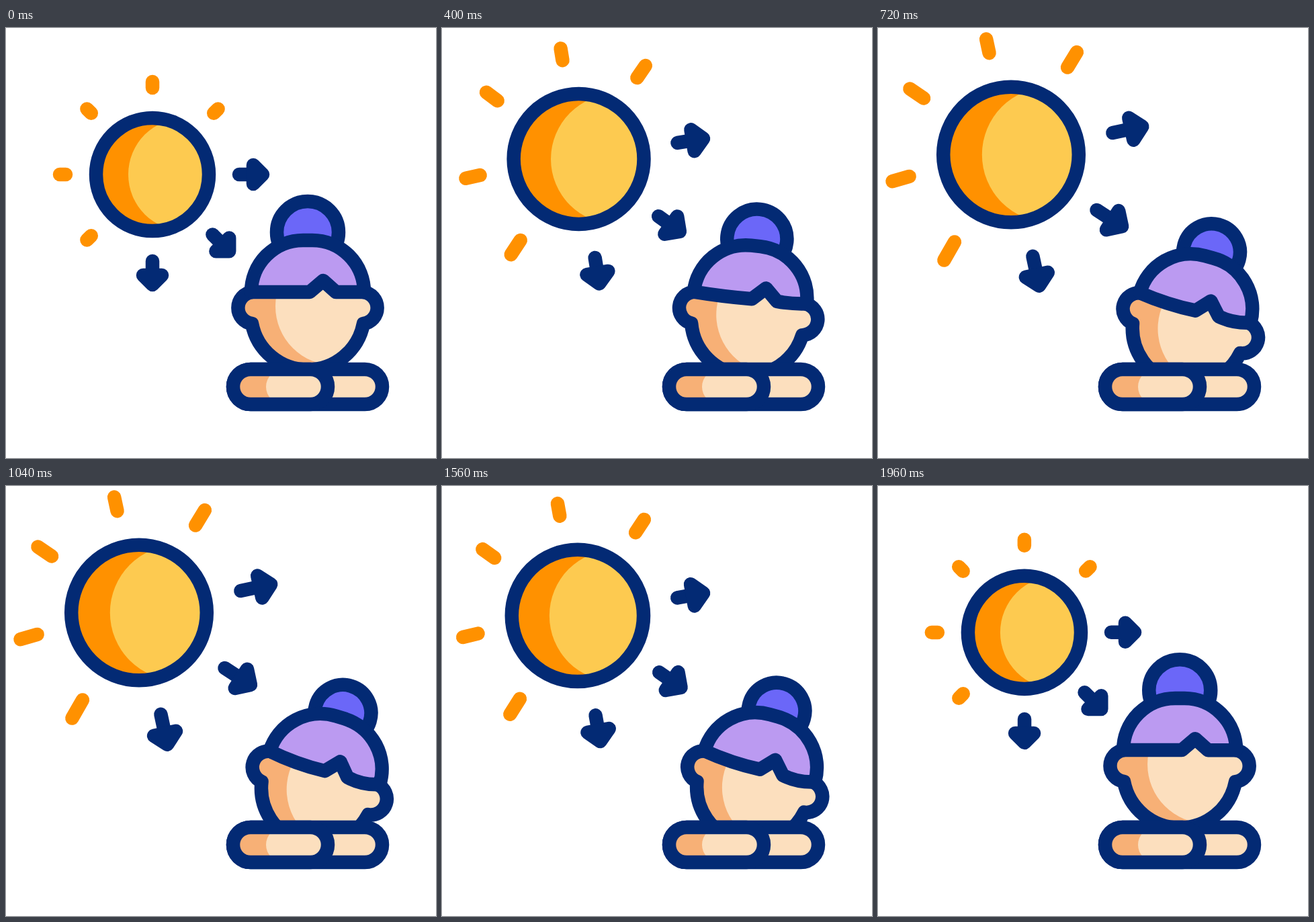
Animation of 640 by 640 pixels, one loop 2000 ms. Source, as an HTML page without scripts:

```html
<!DOCTYPE html>
<html lang="en">
<head>
<meta charset="utf-8">
<title>Sun and resting head</title>
<style>
  /* --sun: sun growth, --nod: head tilt, --push: arrow pulse */
  @property --sun { syntax: "<number>"; inherits: true; initial-value: 0; }
  @property --nod { syntax: "<number>"; inherits: true; initial-value: 0; }
  @property --push { syntax: "<number>"; inherits: true; initial-value: 0; }

  html, body { margin: 0; width: 100%; height: 100%; overflow: hidden; background: #fff; }
  svg {
    display: block; width: 100%; height: 100%;
    --line: 20.5px;
    animation: grow 2s infinite, nod 2s infinite, push 2s infinite;
  }

  @keyframes grow {
    0%, 4% { --sun: 0; animation-timing-function: cubic-bezier(.4, 0, .25, 1); }
    35% { --sun: 1; }
    71% { --sun: 1; animation-timing-function: cubic-bezier(.33, 0, .67, 1); }
    99%, 100% { --sun: 0; }
  }
  @keyframes nod {
    0%, 4% { --nod: 0; animation-timing-function: cubic-bezier(.33, 0, .67, 1); }
    44% { --nod: 1; }
    74% { --nod: 1; animation-timing-function: cubic-bezier(.33, 0, .67, 1); }
    99%, 100% { --nod: 0; }
  }
  @keyframes push {
    0%, 20% { --push: 0; animation-timing-function: cubic-bezier(.33, 0, .67, 1); }
    46% { --push: 1; animation-timing-function: cubic-bezier(.33, 0, .67, 1); }
    68%, 100% { --push: 0; }
  }
  @keyframes fringe {
    0%, 4%, 99%, 100% {
      d: path("M365 393Q408 393 452 393L472 376L491 393Q512 393 533 393A77 77 0 0 0 456 316H442A77 77 0 0 0 365 393Z");
      animation-timing-function: cubic-bezier(.33, 0, .67, 1);
    }
    44%, 74% {
      d: path("M364 393Q408 400 451 397L469 377L486 396Q510 401 535 392A79 78 0 0 0 456 314H443A79 79 0 0 0 364 393Z");
      animation-timing-function: cubic-bezier(.33, 0, .67, 1);
    }
  }

  .ink { stroke: #032a74; stroke-width: var(--line); stroke-linecap: round; stroke-linejoin: round; fill: none; }

  .flare {
    --size: calc(1 + .2 * var(--sun));
    --line: calc(20.5px / var(--size));
    transform-origin: 175.7px 326.7px;
    transform: rotate(calc(-12.1deg * var(--sun))) scale(var(--size));
  }
  .disc { transform-origin: 218px 218px; transform: rotate(calc(12.1deg * var(--sun))); }
  .rays rect {
    fill: #ff9100;
    transform: rotate(var(--at)) translateX(129px) rotate(calc(var(--turn) * var(--sun)));
    x: calc(var(--line) / -2);
    y: calc(var(--line) / -2);
    width: calc(9px + var(--line) + var(--more) * var(--sun));
    height: var(--line);
    rx: calc(var(--line) / 2);
  }
  .tip { fill: #032a74; transform: translateX(calc(-1.5px * var(--sun) + 5.8px * var(--push))); }

  .head { transform-origin: 373px 488px; transform: rotate(calc(17.2deg * var(--nod))); }
  .bun {
    fill: #6b67f8;
    r: calc(46px - 4px * var(--nod));
    transform: translate(calc(2.3px * var(--nod)), calc(2.7px * var(--nod)));
  }
  .hair { fill: #bb9af1; animation: fringe 2s infinite; }
  .skin { fill: #fcdfbe; }
  .shade { fill: #f7b076; }
</style>
</head>
<body>
<svg viewBox="0 0 640 640">
  <defs>
    <clipPath id="round"><circle cx="218" cy="218" r="84"/></clipPath>
    <path id="jaw" d="M366 393A23.7 23.7 0 0 0 366 440A84.5 84.5 0 0 0 532 440A23.7 23.7 0 0 0 532 393"/>
    <clipPath id="inner"><use href="#jaw"/></clipPath>
    <g id="arrow">
      <path class="ink" d="M129 0H159"/>
      <path class="ink tip" d="M150 -14L164 0L150 14Z"/>
    </g>
  </defs>

  <g class="flare">
    <g class="disc">
      <circle cx="218" cy="218" r="84" fill="#ff9100"/>
      <circle cx="266" cy="218" r="84" fill="#fdca50" clip-path="url(#round)"/>
      <circle class="ink" cx="218" cy="218" r="84"/>
    </g>
    <g class="rays" transform="translate(218 218)">
      <rect style="--at:135deg; --more:17px; --turn:-3deg"/>
      <rect style="--at:180deg; --more:12.8px; --turn:-4deg"/>
      <rect style="--at:225deg; --more:11.7px; --turn:1deg"/>
      <rect style="--at:270deg; --more:8.5px; --turn:0deg"/>
      <rect style="--at:315deg; --more:13px; --turn:-1.5deg"/>
    </g>
    <g transform="translate(218 218)">
      <use href="#arrow"/>
      <use href="#arrow" transform="rotate(45) translate(-2.5 0)"/>
      <use href="#arrow" transform="rotate(90)"/>
    </g>
  </g>

  <g class="head">
    <circle class="ink bun" cx="449" cy="304" r="46"/>
    <use href="#jaw" class="shade"/>
    <circle class="skin" cx="489" cy="414" r="88" clip-path="url(#inner)"/>
    <path class="skin" d="M450 396L471 378L492 396Z"/>
    <use href="#jaw" class="ink"/>
    <path class="ink hair" d="M365 393Q408 393 452 393L472 376L491 393Q512 393 533 393A77 77 0 0 0 456 316H442A77 77 0 0 0 365 393Z"/>
  </g>

  <g>
    <rect class="skin" x="338" y="508" width="222" height="52" rx="26"/>
    <rect class="ink" x="338" y="508" width="222" height="52" rx="26"/>
    <rect class="shade" x="338" y="508" width="141" height="52" rx="26"/>
    <rect class="skin" x="387" y="508" width="92" height="52" rx="26"/>
    <rect class="ink" x="338" y="508" width="141" height="52" rx="26"/>
  </g>
</svg>
</body>
</html>
```
